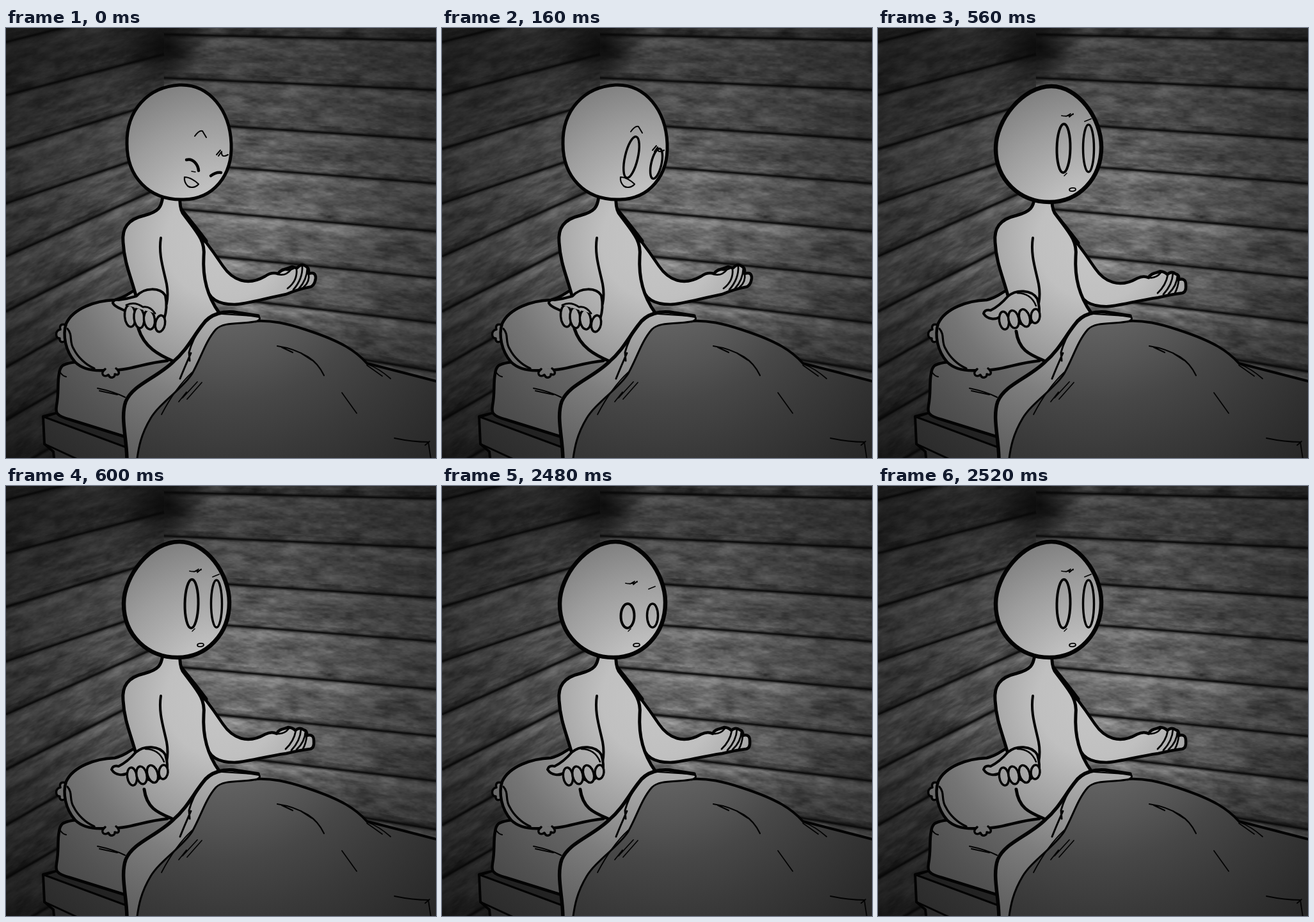
Animation, 672 px wide and 672 px high, one loop 5000 ms. Source, as an HTML page with a canvas:

```html
<!DOCTYPE html>
<html>
<head>
<meta charset="utf-8">
<style>
html, body { margin: 0; width: 100%; height: 100%; overflow: hidden; background: #111; }
canvas { display: block; width: 100vw; height: 100vh; }
</style>
</head>
<body>
<canvas id="stage" width="672" height="672"></canvas>
<script>
const SIZE = 672, LOOP = 5000, CORNER = 247;
const INK = '#030303';
const ctx = document.getElementById('stage').getContext('2d');

// The lamp: brightness falls off with distance from this point.
const LAMP = { x: 340, y: 335 };
const FALLOFF = [[0, 1], [90, 0.97], [190, 0.79], [250, 0.66], [330, 0.54], [430, 0.41], [560, 0.27]];

function light(d) {
  for (let i = 1; i < FALLOFF.length; i++) {
    const [d0, l0] = FALLOFF[i - 1], [d1, l1] = FALLOFF[i];
    if (d <= d1) return l0 + (l1 - l0) * (d - d0) / (d1 - d0);
  }
  return 0.27;
}

function lit(albedo) {
  const g = ctx.createRadialGradient(LAMP.x, LAMP.y, 0, LAMP.x, LAMP.y, 560);
  for (const [d, l] of FALLOFF) {
    const v = Math.round(albedo * l);
    g.addColorStop(d / 560, `rgb(${v},${v},${v})`);
  }
  return g;
}

const SKIN = lit(198), PILLOW = lit(178), MATTRESS = lit(152), BLANKET = lit(108),
      FOLD = lit(190), FRAME = lit(102), FRAME_TOP = lit(68);

function hash(x, y) {
  let h = Math.imul(x, 374761393) + Math.imul(y, 668265263) | 0;
  h = Math.imul(h ^ h >>> 13, 1274126177);
  return ((h ^ h >>> 16) >>> 0) / 4294967296;
}

function noise(x, y) {
  const xi = Math.floor(x), yi = Math.floor(y);
  const fx = x - xi, fy = y - yi;
  const u = fx * fx * (3 - 2 * fx), v = fy * fy * (3 - 2 * fy);
  const a = hash(xi, yi), b = hash(xi + 1, yi);
  const c = hash(xi, yi + 1), d = hash(xi + 1, yi + 1);
  return a + (b - a) * u + (c - a + (a - b - c + d) * u) * v;
}

// Plank seams: y at the left and right end of each wall
const LEFT = { x0: 0, x1: CORNER, albedo: 96,
  seams: [[-62, -112], [22, -40], [105, 41], [189, 114], [274, 191], [357, 247], [443, 318], [530, 389], [613, 470], [697, 550]] };
const RIGHT = { x0: CORNER, x1: SIZE, albedo: 108,
  seams: [[-60, -55], [10, 20], [78, 97], [147, 175], [210, 243], [281, 318], [349, 391], [411, 461], [466, 537], [535, 612], [604, 687]] };

function plankAt(side, x, y) {
  const k = (x - side.x0) / (side.x1 - side.x0);
  const seamY = ([a, b]) => a + (b - a) * k;
  let row = 1;
  while (row < side.seams.length - 1 && seamY(side.seams[row]) <= y) row++;
  const top = seamY(side.seams[row - 1]);
  return { row, depth: (y - top) / (seamY(side.seams[row]) - top) };
}

function paintWall() {
  const wall = document.createElement('canvas');
  wall.width = wall.height = SIZE;
  const w = wall.getContext('2d');
  const image = w.createImageData(SIZE, SIZE);
  for (let y = 0, i = 0; y < SIZE; y++) {
    for (let x = 0; x < SIZE; x++, i += 4) {
      const side = x < CORNER ? LEFT : RIGHT;
      const { row, depth } = plankAt(side, x, y);
      const v = depth * 72 + row * 500, u = x + row * 91;
      const patches = noise(u / 30, v / 11);
      const streaks = noise(u / 12, v / 4);
      const grain = noise(u / 4, v / 1.8);
      let tone = 0.54 + 0.42 * patches + 0.3 * streaks + 0.14 * grain;
      tone += 0.22 * Math.exp(-(((depth - 0.14) / 0.1) ** 2));
      if (depth > 0.85) tone -= 0.14;
      const v8 = side.albedo * light(Math.hypot(x - LAMP.x, y - LAMP.y)) * tone;
      image.data[i] = image.data[i + 1] = image.data[i + 2] = v8;
      image.data[i + 3] = 255;
    }
  }
  w.putImageData(image, 0, 0);

  for (const { x0, x1, seams } of [LEFT, RIGHT]) {
    for (const [a, b] of seams) {
      for (const [width, alpha] of [[8, 0.16], [5, 0.35], [2.6, 0.75]]) {
        w.strokeStyle = `rgba(8,8,8,${alpha})`;
        w.lineWidth = width;
        w.beginPath();
        w.moveTo(x0, a);
        w.lineTo(x1, b);
        w.stroke();
      }
    }
  }

  const shade = (x, y, r, alpha) => {
    const g = w.createRadialGradient(x, y, 0, x, y, r);
    g.addColorStop(0, `rgba(8,8,8,${alpha})`);
    g.addColorStop(1, 'rgba(8,8,8,0)');
    w.fillStyle = g;
    w.fillRect(0, 0, SIZE, SIZE);
  };
  shade(252, 30, 62, 0.9);
  shade(215, 30, 90, 0.45);
  shade(0, 0, 240, 0.35);
  shade(0, 672, 260, 0.35);
  return wall;
}
const wall = paintWall();

function draw(path, width, fill) {
  const p = typeof path === 'string' ? new Path2D(path) : path;
  if (fill) {
    ctx.fillStyle = fill;
    ctx.fill(p);
  }
  if (width) {
    ctx.lineWidth = width;
    ctx.stroke(p);
  }
}

function oval(x, y, rx, ry, tilt, width, fill) {
  const p = new Path2D();
  p.ellipse(x, y, rx, ry, tilt * Math.PI / 180, 0, Math.PI * 2);
  draw(p, width, fill);
}

function drawBed() {
  draw('M58 607 L82 601 L195 640 V680 H76 L74 662 L60 650 Z', 4, FRAME);
  draw('M60 608 L82 601 L195 637 V658 Z', 3, FRAME_TOP);
  draw('M60 650 L112 674', 3);
  draw('M88 528 C100 519 140 520 262 515 L262 560 L190 640 L100 612 C78 606 77 601 79 590 C83 568 80 556 83 540 Q84 532 88 528 Z', 4.5, MATTRESS);
  draw('M84 537 Q88 544 94 545 M143 563 Q168 568 186 577 M146 567 L174 573', 2);
}

function drawPillow() {
  draw('M96 468 C91 460 82 463 85 471 C76 473 77 485 84 485 C83 492 91 494 97 483 Z', 3.5, PILLOW);
  draw('M214 404 C196 409 190 421 170 425 C140 426 105 438 94 462 C88 480 93 505 108 522 C120 534 140 536 155 535 C190 537 212 524 252 520 L275 500 Z', 4.5, PILLOW);
  draw('M155 533 C146 540 153 547 160 542 C163 549 171 546 170 541 C178 544 178 537 172 532', 3.5, PILLOW);
  draw('M96 470 C105 480 98 490 106 502 C112 514 124 526 138 532', 3.2);
}

function drawBlanket() {
  draw('M340 462 C375 453 420 456 470 472 C525 490 547 505 564 524 L680 554 V680 H195 L200 620 L270 535 L305 470 Z', 0, BLANKET);
  draw('M388 458 C415 456 440 462 470 472 C525 490 547 505 564 524 L680 554', 4);
  const outer = 'M394 450 L362 445 C342 441 319 446 307 464 C292 483 282 504 262 521 C236 547 198 557 187 584 C178 610 190 645 189 680';
  const inner = 'C207 655 211 635 226 610 C240 586 277 563 291 540 C305 515 312 489 328 471 C340 459 365 463 388 459 C394 459 400 455 394 450';
  draw(`${outer} H204 ${inner} Z`, 0, FOLD);
  draw(`M204 680 ${inner}`, 3);
  draw(outer, 5.5);
  draw('M307 463 Q291 487 286 507 L287 520 M289 508 Q278 533 272 548', 3);
  draw('M338 447 L385 450 M291 538 Q265 562 243 604 M306 554 L283 580 M299 553 L276 578 M282 569 L270 584', 1.8);
  draw('M424 497 Q451 501 472 514 Q488 524 497 543 M431 499 L448 507 M461 508 L478 519', 2.2);
  draw('M564 525 Q583 532 601 548 M564 527 L588 544 M525 570 L548 602 M607 641 Q636 647 660 647 L664 674 M655 652 L662 646', 1.8);
}

function drawRightArm(smile) {
  const hand = smile
    ? 'L405 388 Q415 381 425 384 C430 376 440 377 447 373 Q453 375 455 375 Q462 367 468 372 Q474 374 473 384 Q484 380 484 391 Q482 404 474 405 Q457 408 438 416'
    : 'L405 388 Q415 383 423 387 C426 379 436 380 441 377 Q449 378 452 382 Q459 376 465 381 Q471 382 470 390 Q481 387 481 398 Q482 410 475 411 Q458 413 438 418';
  draw(`M274 287 C299 316 325 351 339 372 C354 394 377 404 405 388 ${hand} C403 423 373 432 357 432 C333 432 316 425 311 399`, 4.5, SKIN);
  draw('M274 285 Q297 313 312 333', 7);
  if (smile) draw('M425 385 Q437 388 445 378 M454 376 Q456 395 440 407 M463 372 Q464 392 449 409 M471 375 Q470 394 458 407 M473 384 Q475 397 465 405 M432 377 Q442 380 449 376', 2.8);
  else draw('M425 387 Q435 388 442 379 M453 382 Q450 399 437 411 M461 380 Q460 398 446 413 M468 384 Q467 400 454 412 M470 390 Q469 402 464 411', 2.8);
}

function drawBody(smile) {
  const arm = 'M245 263 C243 280 239 287 216 293 C190 299 181 313 183 335 C185 367 194 385 203 418';
  const back = smile ? '207 470 C216 499 239 511 262 521' : '216 474 C220 505 239 511 262 521';
  draw(`${arm} L${back} L333 445 C315 418 307 390 309 357 C312 331 297 318 275 290 Q271 280 272 263 Z`, 0, SKIN);
  draw(`${arm} M272 263 Q271 280 276 289 C297 318 312 331 309 357 C307 391 315 420 333 445 M${back}`, 5);
  draw('M242 328 C238 354 246 376 251 400 Q254 416 251 431', 4);
}

function drawLeftHand(smile) {
  if (smile) {
    draw('M204 419 C216 405 241 405 249 418 Q253 437 247 455 L232 462 L190 445 C184 438 172 439 167 430 Q167 424 176 425 Q191 423 204 419 Z', 4, SKIN);
    oval(194, 450, 8.5, 17, -4, 3.5, SKIN);
    oval(208, 453, 8, 16, -5, 3.5, SKIN);
    oval(224, 456, 8.5, 15, -7, 3.5, SKIN);
    oval(241, 462, 7.5, 13, 10, 3.5, SKIN);
    draw('M188 433 Q201 427 214 436 Q225 434 233 446', 3, SKIN);
  } else {
    draw('M203 416 C216 405 240 405 249 420 Q254 436 251 449 L232 462 L191 448 C184 453 171 453 165 443 Q167 436 176 438 Q190 431 203 416 Z', 4, SKIN);
    oval(197, 454, 7.5, 14, -8, 3.5, SKIN);
    oval(212, 452, 8, 14, -12, 3.5, SKIN);
    oval(229, 450, 8, 14, -17, 3.5, SKIN);
    oval(246, 447, 7, 11, 5, 3.5, SKIN);
    draw('M218 411 Q239 411 247 431', 2.5);
  }
}

function drawSmileHead(open) {
  draw('M271 89 C318 87 350 129 352 181 C354 231 324 267 278 268 C222 270 189 231 189 181 C188 128 222 92 271 89 Z', 5, SKIN);
  if (open) {
    oval(296, 202 + 8 * (1 - open), 10, 33 * open, 13, 3.5);
    oval(335, 212 + 9 * (1 - open), 8, 24 * open, 13, 3.5);
  } else {
    draw('M282 206 C292 203 300 213 301 223 M320 231 Q328 225 336 226', 4.5);
    draw('M290 224 L296 225', 1.5);
  }
  shifted(-7 * open, () =>
    draw('M295 169 Q302 159 307 161 L313 171 M329 198 L335 191 M332 200 L337 193 Q336 204 347 198', 2));
  draw('M279 233 C287 233 296 239 301 244 C296 250 288 250 284 247 Q278 241 279 233 Z', 2.2);
}

function drawCalmHead(open) {
  draw('M271 87 C312 87 349 136 349 182 C349 232 313 268 268 268 C222 268 184 234 184 184 C184 140 226 87 271 87 Z', 6.5, SKIN);
  if (open) {
    oval(290, 222 - 38 * open, 10.5, 38 * open, 1, 4);
    oval(329, 221 - 37 * open, 8.5, 37 * open, 0, 3.5);
  } else {
    draw('M279 211 Q283 216 290 218 Q296 217 300 214 M320 210 Q328 219 338 215', 5);
    draw('M284 215 Q290 222 297 215 M324 214 Q330 221 336 215', 4);
  }
  draw('M291 227 L295 223', 1.5);
  shifted(38 * (1 - open), () =>
    draw('M287 133 Q295 135 305 131 M294 134 L301 130 M299 135 L305 130 M323 142 L333 138', 1.8));
  oval(304, 248.5, 5, 2.6, -5, 1.8);
}

// Each pose holds until its end time.
const POSES = [
  { end: 120, smile: true, open: 0, drop: 0 },
  { end: 160, smile: true, open: 0.5, drop: 0 },
  { end: 520, smile: true, open: 1, drop: 0 },
  { end: 560, smile: true, open: 0, drop: 0 },
  { end: 600, smile: false, open: 1, drop: 4 },
  { end: 2440, smile: false, open: 1, drop: 0 },
  { end: 2480, smile: false, open: 0, drop: 0 },
  { end: 2520, smile: false, open: 0.5, drop: 0 },
  { end: LOOP, smile: false, open: 1, drop: 0 }
];

function shifted(dy, paint) {
  ctx.save();
  ctx.translate(0, dy);
  paint();
  ctx.restore();
}

function render(time) {
  const { smile, open, drop } = POSES.find(p => time < p.end);
  ctx.strokeStyle = INK;
  ctx.lineCap = ctx.lineJoin = 'round';
  ctx.drawImage(wall, 0, 0);
  drawBed();
  drawPillow();
  shifted(drop * 0.8, () => drawRightArm(smile));
  drawBody(smile);
  shifted(drop * 0.8, () => drawLeftHand(smile));
  drawBlanket();
  shifted(drop, () => smile ? drawSmileHead(open) : drawCalmHead(open));
}

const start = performance.now();
function tick() {
  render((performance.now() - start) % LOOP);
  requestAnimationFrame(tick);
}
tick();
</script>
</body>
</html>
```
